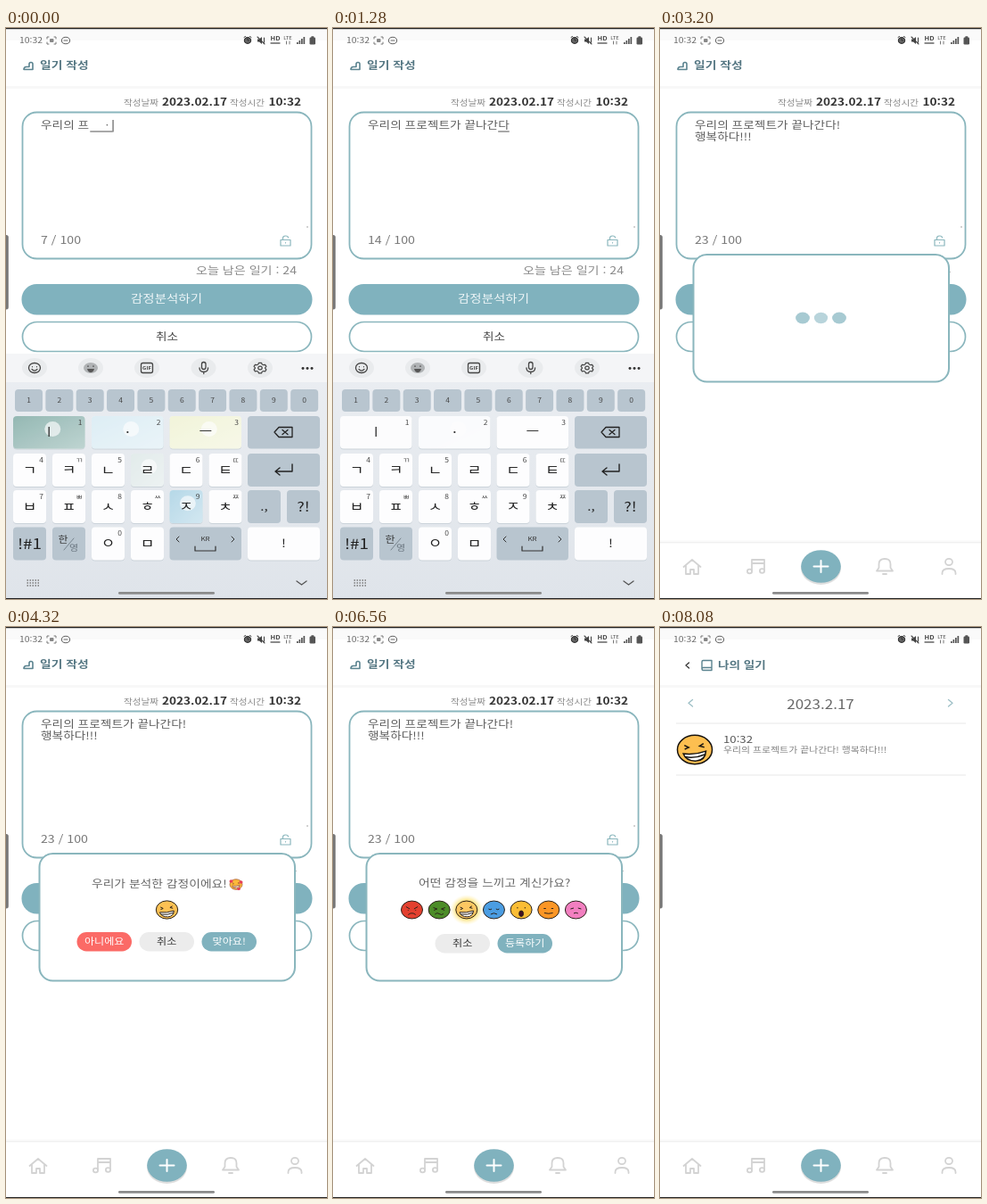
These frames come from a looping animation (360x640 px, 8160 ms). An HTML page:

```html
<!DOCTYPE html>
<html lang="ko">
<head>
<meta charset="utf-8">
<title>일기 작성</title>
<style>
html, body { margin: 0; width: 100%; height: 100%; overflow: hidden; background: #fff; }
svg { display: block; width: 360px; height: 640px; }
text { font-family: "Noto Sans CJK KR", "Noto Sans CJK", "Noto Sans CJK JP", sans-serif; white-space: pre; }
.line { fill: none; stroke-linecap: round; stroke-linejoin: round; }
</style>
</head>
<body>
<svg id="stage" viewBox="0 0 360 640" xmlns="http://www.w3.org/2000/svg"></svg>
<script>
const LOOP = 8160, STEP = 80, SQUASH = 0.83;
const TEAL = '#80b2be', EDGE = '#8ab6bd', KEY_GRAY = '#b8c5cf';
const $ = id => document.getElementById(id);

// ---- drawing helpers (y of text is its visual centre) ----
const text = (x, y, size, str, fill = '#666', anchor = 'start', weight = 400, id = '') =>
  `<text transform="translate(${x} ${y + size * 0.31}) scale(1 ${SQUASH})" font-size="${size}" fill="${fill}"
    text-anchor="${anchor}" font-weight="${weight}" ${id && `id="${id}"`}>${str}</text>`;
const mid = (x, y, size, str, fill, weight) => text(x, y, size, str, fill, 'middle', weight);
const box = (x, y, w, h, r, fill, extra = '') =>
  `<rect x="${x}" y="${y}" width="${w}" height="${h}" rx="${r}" fill="${fill}" ${extra}/>`;
const oval = (x, y, rx, ry, fill, extra = '') =>
  `<ellipse cx="${x}" cy="${y}" rx="${rx}" ry="${ry}" fill="${fill}" ${extra}/>`;
const ring = (x, y, rx, ry, stroke, w) => oval(x, y, rx, ry, 'none', `stroke="${stroke}" stroke-width="${w}"`);
const line = (d, stroke, w = 1.5) => `<path class="line" d="${d}" stroke="${stroke}" stroke-width="${w}"/>`;
const group = (id, ...parts) => `<g id="${id}">${parts.join('')}</g>`;

// ---- faces, drawn on a unit circle: strokes, mouth, mouth fill ----
const looks = {
  grin: ['M-.6-.3L-.35-.15L-.58-.03M.5-.42L.28-.25L.55-.17M-.55.5Q.05.62.6.32', 'M-.66.28Q0 .38.64.1Q.62.72.08.78Q-.5.8-.66.28Z', '#fff'],
  angry: ['M-.55-.35L-.2-.1M.55-.35L.2-.1M-.35 0v.08M.35 0v.08', 'M-.35.55Q0 .2 .35.55', 'none'],
  sick: ['M-.55-.25L-.2-.1L-.5.05M.55-.25L.2-.1L.5.05', 'M-.4.5Q-.2.25 0 .45T.4.45', 'none'],
  sad: ['M-.5-.1Q-.35.05-.2-.1M.2-.1Q.35.05.5-.1', 'M-.3.5Q0 .25 .3.5', 'none'],
  scream: ['M-.35-.3v.14M.35-.3v.14', 'M-.2.45Q-.2.1 0 .1T.2.45Q.2.75 0 .75T-.2.45Z', '#412'],
  flat: ['M-.45-.15h.2M.25-.15h.2', 'M-.4.35Q0 .5 .4.35', 'none'],
  shy: ['M-.5-.1L-.2-.2M.5-.1L.2-.2', 'M-.2.4Q0 .25 .2.4', 'none']
};
const face = (x, y, r, color, look, ink = '#2a211a', w = 1) => {
  const [marks, mouth, fill] = looks[look];
  const pen = `stroke="${ink}" stroke-width="${w}" vector-effect="non-scaling-stroke"`;
  return `<g transform="translate(${x} ${y}) scale(${r} ${r * SQUASH})">
    <circle r="1" fill="${color}" ${pen}/><path d="${mouth}" fill="${fill}" ${pen}/>
    <path d="${marks}" fill="none" ${pen}/></g>`;
};

// ---- keyboard ----
const cols = [8, 52, 96, 140, 183.5, 227.5, 271, 315];
const glowKey = (x, y, w, h, name, label, hint = '', size = 17) =>
  box(x, y + 1, w, h, 4, '#cbd3da') + box(x, y, w, h, 4, '#fdfdfe') +
  `<g id="key${name}" opacity="0">${box(x, y, w, h, 4, '#fff')}${box(x, y, w, h, 4, 'url(#sheen)')}
    ${oval(x + w * 0.55, y + h * 0.4, 9, 8.5, '#fff', 'opacity=".65"')}</g>` +
  mid(x + w / 2, y + h / 2 - 1, size, label, '#222', 500) +
  text(x + w - 3, y + 7, 8.5, hint, '#444', 'end');
const grayKey = (x, y, w, h, label = '', size = 17, ink = '#222') =>
  box(x, y, w, h, 4, KEY_GRAY) + mid(x + w / 2, y + h / 2, size, label, ink);
const keyRow = (y, names, hints) =>
  [...names].map((n, i) => glowKey(cols[i], y, 37, 37, n, n, hints[i])).join('');

const toolbar = [32, 95, 158, 221.5, 285].map(x => oval(x, 381, 14, 11, '#e9ebed')).join('') +
  ring(32, 381, 6.5, 5.5, '#444', 1.3) + line('M29 382.5q3 3 6 0M29.5 379.5v.3M34.5 379.5v.3', '#444', 1.2) +
  oval(95, 381, 8, 6, '#b0b3b5') + line('M92 379v.3M98 379v.3', '#444', 1.4) +
  '<path d="M91 382h8q-1 4-4 4t-4-4z" fill="#555"/>' +
  box(151.5, 375.5, 13, 11, 2, 'none', 'stroke="#444" stroke-width="1.3"') + mid(158, 381, 6, 'GIF', '#444', 700) +
  box(219.5, 374.5, 4.5, 8, 2.2, 'none', 'stroke="#444" stroke-width="1.3"') +
  line('M217 381q0 4.500 4.800 4.500t4.800-4.500M221.800 385.500v2', '#444', 1.3) +
  line('M283.500 375.300h3l.7 1.700 1.500.7 1.900-.4 1.300 2-1.200 1.400v.8l1.200 1.400-1.300 2-1.900-.4-1.500.7-.7 1.700h-3l-.7-1.700-1.500-.7-1.900.4-1.300-2 1.200-1.400v-.8l-1.200-1.400 1.300-2 1.900.4 1.500-.7z', '#444', 1.2) +
  ring(285, 381, 2.2, 1.9, '#444', 1.2) +
  [333, 338, 343].map(x => oval(x, 381.5, 1.5, 1.4, '#333')).join('');

const keyboard = group('keyboard',
  box(0, 365, 360, 275, 0, 'url(#board)'), box(0, 365, 360, 32, 0, '#f4f5f7'), toolbar,
  ...[...'1234567890'].map((d, i) => grayKey(10 + i * 34.35, 405, 31, 25, d, 8.5, '#444')),
  glowKey(8, 435, 80.5, 36.5, 'ㅣ', 'ㅣ', '1', 15), glowKey(96, 435, 80.5, 36.5, '·', '·', '2'),
  glowKey(183.5, 435, 80.5, 36.5, 'ㅡ', 'ㅡ', '3', 16),
  grayKey(271, 435, 81, 36.5),
  line('M301 453l5-5.500h15v11h-15zM310 450.500l6 5M316 450.500l-6 5', '#222', 1.3),
  keyRow(477, 'ㄱㅋㄴㄹㄷㅌ', ['4', 'ㄲ', '5', '', '6', 'ㄸ']),
  grayKey(271, 477, 81, 37), line('M321 489v8h-18M307 493l-5 4 5 4', '#222', 1.4),
  keyRow(518, 'ㅂㅍㅅㅎㅈㅊ', ['7', 'ㅃ', '8', 'ㅆ', '9', 'ㅉ']),
  grayKey(271, 518, 37, 37, '.,', 15), grayKey(315, 518, 37, 37, '?!', 18),
  grayKey(8, 559.5, 37, 37, '!#1', 19), grayKey(52, 559.5, 37, 37),
  mid(64, 573, 12, '한', '#333'), mid(76, 583, 11, '영', '#68747e'), line('M65 585l11-13', '#68747e', 0.8),
  glowKey(96, 559.5, 37, 37, 'ㅇ', 'ㅇ', '0'), glowKey(140, 559.5, 37, 37, 'ㅁ', 'ㅁ'),
  grayKey(183.5, 559.5, 80.5, 37), mid(223.5, 573, 8, 'KR', '#333'),
  line('M212 581v5h23v-5', '#333', 1.2), line('M194 570l-3 3 3 3M253 570l3 3-3 3', '#333', 1),
  glowKey(271, 559.5, 81, 37, '!', '!', '', 15),
  ...[619, 622, 625].map(y => `<path d="M23.500 ${y}h15" stroke="#777" stroke-width="1.3" stroke-dasharray="1.5 1.5"/>`),
  line('M326 620l5.500 4 5.500-4', '#555', 1.3));

// ---- pages ----
const statusBar = box(0, 0, 360, 14, 0, '#fafafa') + box(0, 0, 360, 1.2, 0, '#222') +
  text(15, 14, 10.4, '10:32', '#666') +
  line('M46 12v-2h2M54 10h2v2M56 16v2h-2M48 18h-2v-2', '#777', 1) + box(49, 12, 4.5, 4, 1, '#888') +
  ring(67, 14, 4.6, 3.8, '#666', 1.1) + line('M65 14h4', '#666', 1.1) +
  oval(271, 14, 3.6, 3.4, '#666', 'stroke="#333" stroke-width="1.2"') + line('M267 10.500l1.500-1M275 10.500l-1.500-1M271 12v2h1.500', '#333', 1) +
  '<path d="M282 12.500h2l3-2.500v8l-3-2.500h-2z" fill="#444"/>' + line('M282 10l8 8M289.500 11v5', '#444', 1.1) +
  mid(302, 12, 7.5, 'HD', '#444', 700) + line('M297 17h10', '#666', 1.3) +
  mid(316, 11, 6, 'LTE', '#444', 500) + line('M314.500 15v3M318 15v3', '#777', 1) +
  [0, 1, 2, 3].map(i => box(326 + i * 2.5, 16 - i * 2, 1.7, 2 + i * 2, 0, '#555')).join('') +
  box(340.5, 10.5, 6.5, 8, 1.2, '#555') + box(342.3, 9.3, 3, 2, 0.5, '#555');
const headLine = box(0, 65, 360, 3, 0, '#f8f8f8');
const TITLE = '#557783';

const editor = group('editor', headLine,
  line('M20 46.500h10v-6q0-2-2-2t-2 2v3h-3q-3 0-3 3', '#5a838f', 1.6),
  text(38, 42, 13.8, '일기 작성', TITLE, 'start', 700),
  text(132, 84, 10.6, '작성날짜', '#888'), text(175, 83, 13.6, '2023.02.17', '#333', 'start', 700),
  text(251, 84, 10.6, '작성시간', '#888'), text(294.5, 83, 13.6, '10:32', '#333', 'start', 700),
  box(18.5, 94.5, 324, 164, 16, '#fff', `stroke="${EDGE}" stroke-width="1.8"`),
  text(39, 109, 13.7, '', '#5c5c5c', 'start', 400, 'row0'), text(39, 122, 13.7, '', '#5c5c5c', 'start', 400, 'row1'),
  '<rect id="under" height="1" fill="#555"/><rect id="caret" width="1.1" height="13.5" fill="#555"/>',
  text(39, 238, 14.2, '', '#777', 'start', 400, 'count'), oval(338, 223, 0.8, 0.8, '#999'),
  line('M308 237.500h11v6.500h-11zM310.500 237v-1.500q0-2.500 3-2.500t3 2M313.500 240.500v.5', EDGE, 1.2),
  text(326, 272, 14.1, '오늘 남은 일기 : 24', '#888', 'end'),
  box(17.5, 287, 326, 34.5, 17, TEAL), mid(180, 304, 14.5, '감정분석하기', '#edf5f7'),
  box(18.5, 329.5, 324, 33, 16.5, '#fff', `stroke="${EDGE}" stroke-width="1.7"`), mid(180.5, 346, 13.6, '취소', '#444'));

const diary = group('diary', headLine,
  line('M32.500 40l-3.500 3 3.500 3', '#333', 1.3),
  line('M47 47v-8q0-1.500 1.500-1.500h9.500v11h-9.500q-1.500 0-1.500-1.500t1.500-1.500h9.500', '#5a838f', 1.4),
  text(65, 42.5, 13.6, '나의 일기', TITLE, 'start', 700),
  line('M36.500 81.500l-4.500 3.800 4.500 3.800M323.500 81.500l4.500 3.800-4.500 3.800', '#9dbfc6', 1.3),
  mid(180, 86.5, 17, '2023.2.17', '#666'),
  box(18, 107.5, 325, 1, 0, '#e8e8e8'), face(39, 137.5, 19.5, '#fdbf50', 'grin', '#17130f', 1.5),
  text(71, 126, 13.2, '10:32', '#555'), text(71, 137.5, 10.9, '우리의 프로젝트가 끝나간다! 행복하다!!!', '#808080'),
  box(18, 165.5, 325, 1, 0, '#e8e8e8'));

const NAV = '#d3d3d3';
const nav = group('nav', box(0, 574, 360, 2, 0, '#fbfbfb'), box(0, 576, 360, 1.6, 0, '#f0f0f0'), box(0, 577.6, 360, 63, 0, '#fff'),
  line('M26.500 604l9.500-8 9.500 8M29 602v10h5v-5h4v5h5v-10', NAV, 1.8),
  line('M103 608v-12h14v11M103 600h14', NAV, 1.8),
  ring(100.5, 609, 2.6, 2.3, NAV, 1.8), ring(114.5, 608.5, 2.6, 2.3, NAV, 1.8),
  oval(180.5, 605.5, 22.5, 18.5, '#000', 'opacity=".13"'), oval(180.5, 603.5, 22.3, 18.3, TEAL), line('M172.500 603.500h16M180.500 597v13', '#fff', 2),
  line('M243 608.500h18l-2.500-3.500v-4q0-6-6.500-6t-6.500 6v4zM250 612h4', NAV, 1.8),
  ring(324, 598.5, 4, 3.7, NAV, 1.8), line('M316.500 612v-1q0-5 7.500-5t7.500 5v1', NAV, 1.8));

// ---- dialogs ----
const pill = (x, y, label, fill, ink) => box(x, y, 61.5, 21.5, 10.7, fill) + mid(x + 30.7, y + 10.7, 12.1, label, ink);
const feelings = [['#e3402f', 'angry'], ['#4c8c28', 'sick'], ['#fdc862', 'grin'], ['#4b9de2', 'sad'],
  ['#fbbd35', 'scream'], ['#fb9626', 'flat'], ['#f27fc0', 'shy']];
const dialog = group('dialog', box(37.5, 254, 286.5, 142.5, 15, '#fff', `stroke="${EDGE}" stroke-width="2"`),
  group('loading', ...[160, 180.5, 201].map((x, i) => oval(x, 325, 8, 6.5, TEAL, `id="dot${i}"`))),
  group('result', text(96, 288, 13.8, '우리가 분석한 감정이에요!', '#666'),
    face(258, 288.5, 7, '#fcb93b', 'grin', '#a0522d', 0.7),
    oval(252.5, 285, 2, 1.7, '#e8405a'), oval(263.5, 286, 2, 1.7, '#e8405a'), oval(261, 293.5, 1.9, 1.6, '#e8405a'),
    face(180.5, 317, 12.2, '#fdc154', 'grin'),
    pill(79.5, 342, '아니에요', '#fb6a66', '#fff'), pill(149.5, 342, '취소', '#ececec', '#333'), pill(219.5, 342, '맞아요!', TEAL, '#fff')),
  group('choose', text(96, 286.5, 13.8, '어떤 감정을 느끼고 계신가요?', '#666'),
    oval(150, 317, 19, 17, 'url(#halo)', 'id="pick"'),
    ...feelings.map(([c, look], i) => face(88.5 + i * 30.65, 317, 12, c, look)),
    pill(114.5, 344, '취소', '#ececec', '#333'), pill(184.5, 344, '등록하기', TEAL, '#fff')));

$('stage').innerHTML = `<defs>
  <linearGradient id="board" x2="0" y2="1"><stop stop-color="#ebeef2"/><stop offset="1" stop-color="#dfe4ea"/></linearGradient>
  <linearGradient id="sheen" y2="1"><stop stop-color="#fff" stop-opacity="0"/><stop offset="1" stop-color="#fff" stop-opacity=".4"/></linearGradient>
  <radialGradient id="halo"><stop offset=".6" stop-color="#ffe27a"/><stop offset="1" stop-color="#fff3b8" stop-opacity="0"/></radialGradient>
  </defs>` + box(0, 0, 360, 640, 0, '#fff') + editor + diary + nav + dialog + keyboard + statusBar +
  box(-3, 232, 5.8, 83.5, 2.5, '#777') + box(126, 632, 108, 2.8, 1.4, '#8b8b8b') + box(0, 639, 360, 1, 0, '#222');

// ---- typing: each stroke is a key followed by the syllable it leaves; "/" commits a syllable ----
const GLOW = ['#8fb5b0', '#a9d5e6', '#e9edbb', '#9ccbe0', '#8fb5b0', '#bfe2d1', '#bbdfcc'];
const runs = [
  [80, 36, 'ㅡ로/ㅈㅈ,·ㅈㆍ,ㅣ저,ㅣ제,ㄱ젝/ㅌㅌ,ㅡ트/ㄱㄱ,ㅣ기,·가/_ /ㅋㄲ,ㅡ끄,ㅌ끝/ㄴㄴ,ㅣ니,·나/ㄱㄱ,ㅣ기,·가,ㄴ간/ㄷㄷ,ㅣ디,·다'],
  [1400, 120, '!!/_\n'],
  [1640, 36, 'ㅎㅎ,ㅣ히,·하,ㅣ해,ㅇ행/ㅂㅂ,·ㅂㆍ,ㅡ보,ㄱ복/ㅎㅎ,ㅣ히,·하/ㄷㄷ,ㅣ디,·다'],
  [2240, 80, '!!/!!/!!']
];
let typed = '우리의 프';
const strokes = [...'ㄹ·ㅡㅈㅣ'].map((key, i) => ({ at: -200 + i * 50, key, glow: GLOW[i], done: typed, tail: '\u3000ㆍ' }));
for (const [start, gap, script] of runs) {
  let n = 0;
  for (const syllable of script.split('/')) {
    let tail = '';
    for (const s of syllable.split(',')) {
      tail = s.slice(1);
      strokes.push({ at: start + n * gap, key: s[0], glow: GLOW[n % 7], done: typed, tail });
      n++;
    }
    typed += tail;
  }
}
const keyNames = [...'ㅣ·ㅡㄱㅋㄴㄹㄷㅌㅂㅍㅅㅎㅈㅊㅇㅁ!'];

const show = (id, on) => { $(id).style.display = on ? '' : 'none'; };
const set = (id, attrs) => { for (const k in attrs) $(id).setAttribute(k, attrs[k]); };

function drawTyping(t) {
  const past = strokes.filter(s => s.at <= t);
  const { at, done, tail } = past[past.length - 1];
  const rows = (done + tail).split('\n');
  const row = rows.length - 1, y = 103 + row * 13;
  $('row0').textContent = rows[0];
  $('row1').textContent = rows[1] || '';
  $('count').textContent = `${(done + tail).length} / 100`;

  const width = rows[row] ? $('row' + row).getComputedTextLength() : 0;
  const composing = /[^\s!]/.test(tail) ? tail.length * 0.92 * 13.7 : 0;
  set('under', { x: 39 + width - composing, y: y + 12.5, width: composing });
  set('caret', { x: 39 + width, y, opacity: (t - at) % 500 < 250 ? 1 : 0 });

  for (const name of keyNames) {
    const hit = past.filter(s => s.key === name).pop();
    if (!hit) continue;
    const left = Math.max(0, 1 - (t - hit.at) / 400);
    set('key' + name, { opacity: 0.95 * left * left });
    $('key' + name).firstElementChild.setAttribute('fill', hit.glow);
  }
}

function draw(t) {
  const listed = t >= 7400, slide = Math.min(1, Math.max(0, (t - 2560) / 240));
  show('editor', !listed);
  show('diary', listed);
  show('keyboard', slide < 1);
  set('keyboard', { transform: `translate(0 ${275 * slide * slide})` });
  show('under', slide === 0);
  show('caret', slide === 0);
  keyNames.forEach(name => set('key' + name, { opacity: 0 }));
  if (!listed) drawTyping(t);

  show('dialog', t >= 3040 && !listed);
  show('loading', t < 4160);
  show('result', t >= 4160 && t < 5680);
  show('choose', t >= 5680);
  show('pick', t >= 6240);
  const wave = Math.cos((t - 3040) / 800 * 2 * Math.PI);
  [1, -1, 1].forEach((sign, i) => {
    const k = 0.5 + sign * wave * 0.5;
    set('dot' + i, { rx: 7.2 + 1.1 * k, ry: 5.9 + 0.9 * k, 'fill-opacity': 0.4 + 0.45 * k });
  });
}

const begin = performance.now();
function tick() {
  const t = (performance.now() - begin) % LOOP;
  draw(Math.floor(t / STEP) * STEP);
  requestAnimationFrame(tick);
}
tick();
</script>
</body>
</html>
```
